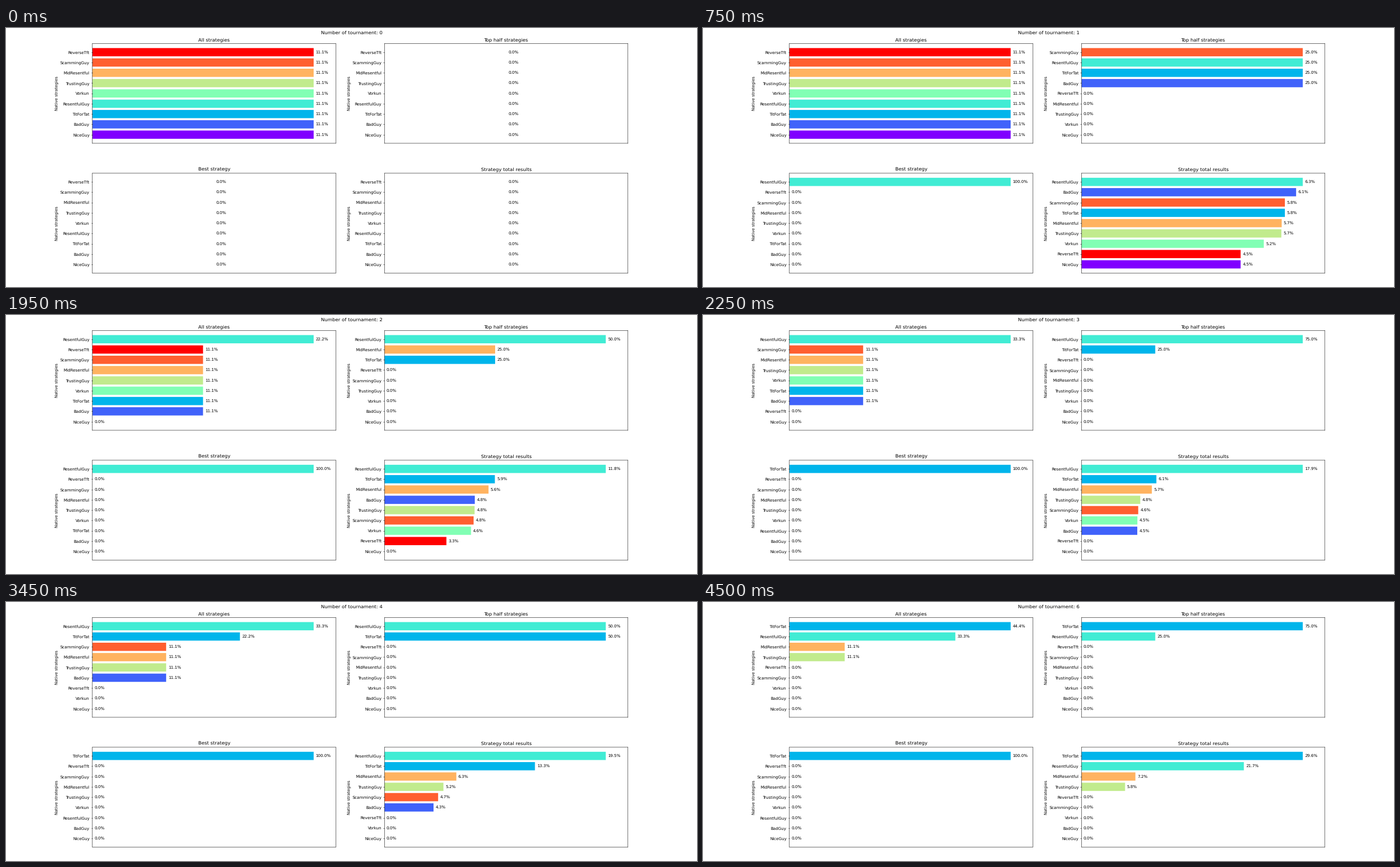
Write a matplotlib script that moves like this. It is 1222 px wide and 458 px high and loops after 5.25 s.

```python
import numpy as np
import matplotlib.pyplot as plt
from matplotlib.animation import FuncAnimation

W, H, DPI = 1222, 458, 64
K = W / 24 / DPI  # scale of point sizes: the layout is 24 inches wide
ROUNDS = 6
SPREAD = 0.35     # how far the copies of one strategy lie apart

plt.rcParams.update({
    "font.family": "DejaVu Sans",
    "font.size": 10 * K,
    "text.hinting": "none",
    "path.snap": False,
    "axes.linewidth": 0.8 * K,
    "axes.titlepad": 6 * K,
    "axes.labelpad": 4 * K,
    "ytick.major.size": 3.5 * K,
    "ytick.major.width": 0.8 * K,
    "ytick.major.pad": 3.5 * K,
})

# score per head of each strategy: first value, early low, late level
STRATEGIES = {
    "NiceGuy": (4.53, 3, 3),
    "BadGuy": (6.11, 4.5, 4.1),
    "TitForTat": (5.79, 5.92, 7.4),
    "ResentfulGuy": (6.3, 5.81, 7.24),
    "Vorkun": (5.19, 4.48, 4.7),
    "TrustingGuy": (5.69, 4.59, 5.83),
    "MidResentful": (5.7, 5.52, 7.21),
    "ScammingGuy": (5.79, 4.5, 4.95),
    "ReverseTft": (4.53, 3, 3),
}
NAMES = list(STRATEGIES)
START, LOW, LATE = np.array(list(STRATEGIES.values())).T
COLORS = plt.cm.rainbow(np.linspace(0, 1, len(NAMES)))
DROPPED = ["NiceGuy", "ReverseTft", "Vorkun", "BadGuy", "ScammingGuy"]


def scores(rnd):
    """Fall quickly from the start to the low, then ease to the late level."""
    fall = 0.2 ** (rnd - 1)
    t = np.clip((rnd - 2.3) / 3.5, 0, 1)
    return START * fall + LOW * (1 - fall) + (LATE - LOW) * t * t * (3 - 2 * t)


def share(players):
    counts = np.bincount(players, minlength=len(NAMES))
    return 100 * counts / max(counts.sum(), 1)


def tournaments():
    """Yield the four data sets; the best is copied over a dropped strategy."""
    heads = np.ones(len(NAMES), int)
    none = np.zeros(len(NAMES))
    yield share(np.arange(len(NAMES))), none, none, none
    for rnd in range(1, ROUNDS + 1):
        score = scores(rnd)
        players = np.repeat(np.arange(len(NAMES)), heads)
        place = np.concatenate([np.arange(n) for n in heads])
        level = score[players] - SPREAD * place / heads[players]
        ranked = players[np.argsort(-level, kind="stable")]
        yield share(players), share(ranked[:4]), share(ranked[:1]), heads * score
        if rnd < ROUNDS:
            heads[ranked[0]] += 1
            heads[NAMES.index(DROPPED[rnd - 1])] -= 1


def draw_bars(ax, title, values):
    ax.clear()
    order = np.argsort(values, kind="stable")
    values = values[order]
    bars = ax.barh(np.arange(len(NAMES)), values, color=COLORS[order])
    ax.bar_label(bars, [f"{v:.1f}%" for v in values], padding=5 * K)
    ax.set_yticks(np.arange(len(NAMES)), [NAMES[i] for i in order])
    ax.set_xticks([])
    ax.set_ylim(-0.84, 8.84)
    top = values.max()
    ax.set_xlim((0, 1.1 * top) if top else (-1, 1))
    ax.set_title(title)
    ax.set_ylabel("Native strategies")


TITLES = ["All strategies", "Top half strategies",
          "Best strategy", "Strategy total results"]
HISTORY = list(tournaments())

fig, axes = plt.subplots(2, 2, figsize=(W / DPI, H / DPI), dpi=DPI)
fig.subplots_adjust(left=0.125, right=0.9, top=0.94, bottom=0.054,
                    wspace=0.2, hspace=0.3)
heading = fig.suptitle("", y=0.99)


def update(rnd):
    heading.set_text(f"Number of tournament: {rnd}")
    for ax, title, values in zip(axes.flat, TITLES, HISTORY[rnd]):
        draw_bars(ax, title, values)
    return []


anim = FuncAnimation(fig, update, frames=len(HISTORY), init_func=lambda: [],
                     interval=750, repeat=True)
plt.show()
```
